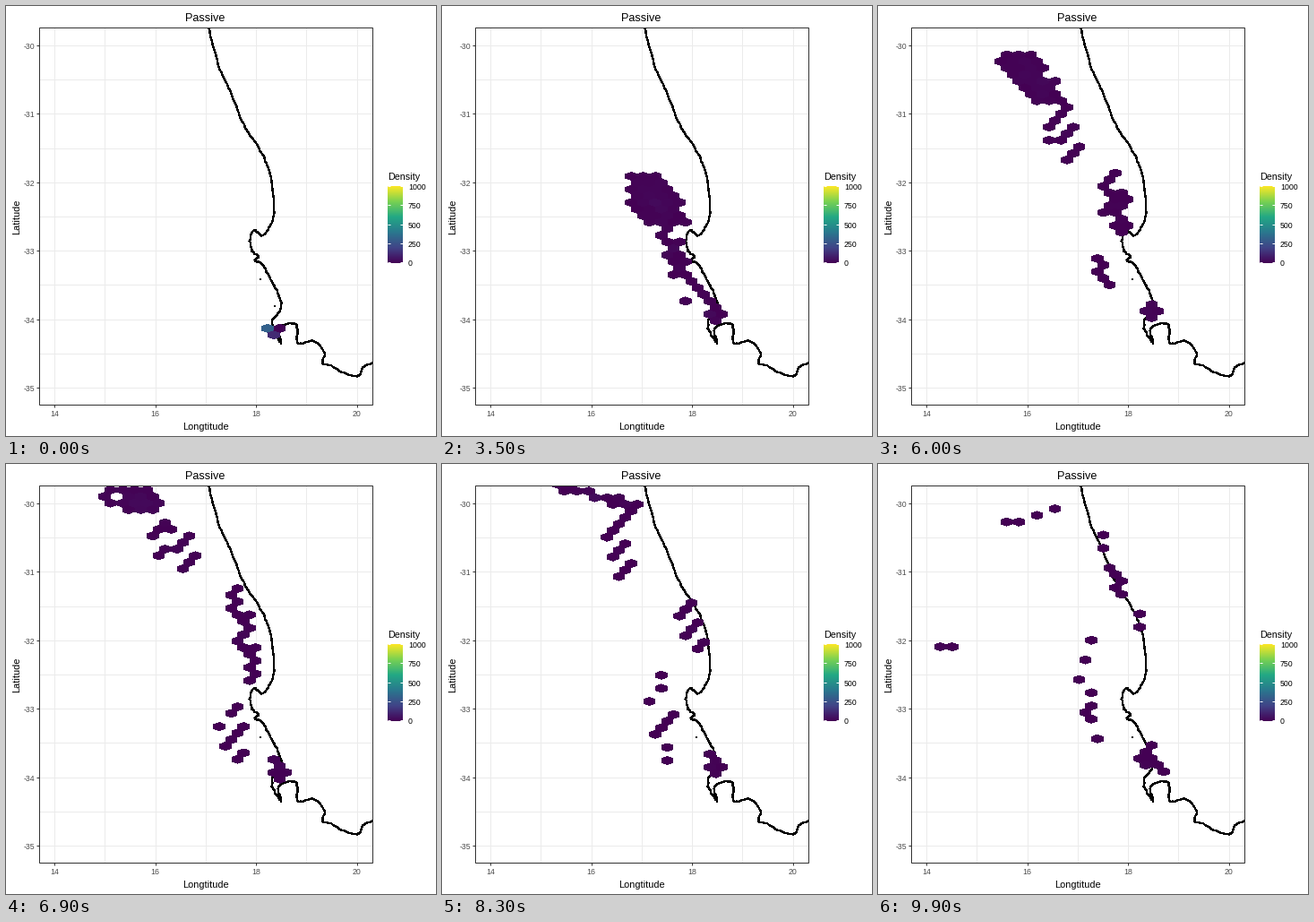
A matplotlib script for the animation above (10 s loop, 480 px wide and 480 px high).

```python
import numpy as np
import matplotlib.pyplot as plt
from matplotlib.animation import FuncAnimation
from matplotlib.collections import PolyCollection
from matplotlib.colors import LinearSegmentedColormap
from matplotlib.patches import Rectangle

plt.rcParams["font.family"] = "Liberation Sans"

SIZE, FRAMES = 480, 100
X0, DX, DY = 285.4, 6.75, 7.335  # hexagon grid: origin, half width, row step
L, R, T, B = 37, 409, 24, 445
WEIGHT = 3  # density carried by one particle
CMAP = LinearSegmentedColormap.from_list(
    "density", plt.get_cmap("viridis")(np.linspace(0, 1, 6)))

fig = plt.figure(figsize=(SIZE / 72, SIZE / 72), dpi=72, facecolor="white")
ax = fig.add_axes([0, 0, 1, 1])
ax.axis("off")


def lon(deg):
    return 54 + 56.25 * (deg - 14)


def lat(deg):
    return 44 - 76.4 * (deg + 30)


def line(x, y, color, width=1, **kw):
    return ax.plot(x, y, color=color, lw=width, solid_capstyle="butt", **kw)[0]


def text(x, y, s, size=8.8, color="black", ha="center", va="baseline", **kw):
    ax.text(x, y, s, fontsize=size, color=color, ha=ha, va=va, **kw)


# Panel, grid and axes
for d in range(14, 21):
    line([lon(d)] * 2, [T, B], "#EBEBEB", zorder=1)
for d in np.arange(-35, -29.5, 0.5):
    line([L, R], [lat(d)] * 2, "#EBEBEB", zorder=1)
for d in range(14, 21, 2):
    line([lon(d)] * 2, [B, B + 3], "#333333")
    text(lon(d), 458.5, str(d), color="#4D4D4D")
for d in range(-35, -29):
    line([L - 3, L], [lat(d)] * 2, "#333333")
    text(32, lat(d) + 4, str(d), color="#4D4D4D", ha="right")
panel = Rectangle((L, T), R - L, B - T, fill=False, ec="#333333", lw=1, zorder=6)
ax.add_patch(panel)
text(222.5, 17, "Passive", 12.6)
text(223, 473, "Longtitude", 11)
text(12, 235, "Latitude", 11, va="center", rotation=90)

# Legend
text(426, 194, "Density", 10.7, ha="left")
ax.imshow(np.linspace(1, 0, 256)[:, None], cmap=CMAP, aspect="auto",
          extent=(426, 443, 287, 201), interpolation="nearest")
for v in range(0, 1001, 250):
    y = 286 - 0.085 * v
    for x in (426, 439.6):
        line([x, x + 3.4], [y, y], "white")
    text(449, y + 4, str(v), ha="left")
ax.set(xlim=(0, SIZE), ylim=(SIZE, 0))

# Coastline: a spline through a few capes and bays, slightly rough
coast = np.array([
    (226, 24), (239, 70), (254, 104), (265, 132), (282, 158), (295, 187),
    (299, 222), (297, 241), (286, 256), (278, 250), (273, 257), (274, 272),
    (282, 279), (278, 284), (286, 288), (296, 307), (303, 320), (307, 337),
    (297, 352), (299, 364), (307, 376), (304, 361), (313, 355), (325, 357),
    (326, 377), (343, 374), (356, 387), (353, 398), (363, 402), (376, 409),
    (393, 413), (399, 403), (410, 398)], float)


def spline(p, steps=8):
    """Catmull-Rom curve through the points p."""
    p = np.vstack([p[0], p, p[-1]])
    a, b, c, d = (q[:, None] for q in (p[:-3], p[1:-2], p[2:-1], p[3:]))
    t = np.linspace(0, 1, steps, endpoint=False)[:, None]
    curve = b + t * (c - a + t * (2 * a - 5 * b + 4 * c - d
                                  + t * (3 * (b - c) + d - a))) / 2
    return np.vstack([curve.reshape(-1, 2), p[-1]])


shape = spline(coast)
shape += np.random.default_rng(4).normal(0, 0.35, shape.shape)
line(*shape.T, "black", 1.3, antialiased=False, zorder=3).set_clip_path(panel)
for x, y, s in [(283, 304, 2), (299, 334, 2), (360, 401, 1)]:
    ax.add_patch(Rectangle((x, y), s, s, color="black", lw=0, zorder=3))

# Particle groups, each strewn along a moving stroke.
# Keys: time, stroke start x y, stroke end x y, half width, particles
plume = [(0, 292, 359.8, 292, 359.8, 0, 105), (4, 292, 359.8, 292, 359.8, 0, 90),
         (23, 272, 273, 300, 322, 11, 85), (35, 226, 190, 252, 245, 25, 100),
         (51, 178, 80, 226, 162, 14, 95), (69, 130, 29, 162, 54, 31, 70),
         (83, 133, 23, 218, 50, 9, 34), (99, 198, 50, 124, 72, 0, 4)]
trail = [(4, 299, 367, 299, 367, 0, 40), (23, 296, 315, 304, 340, 11, 30),
         (35, 252, 246, 265, 300, 10, 28), (51, 243, 168, 218, 226, 18, 20),
         (69, 184, 64, 204, 120, 24, 24), (83, 205, 58, 200, 135, 18, 14),
         (99, 72, 204, 82, 200, 5, 4)]
shore = [(4, 299, 367, 299, 367, 0, 1), (35, 270, 300, 304, 335, 5, 9),
         (51, 272, 228, 264, 278, 13, 16), (69, 258, 139, 278, 242, 12, 24),
         (83, 279, 155, 290, 213, 12, 15), (99, 252, 79, 292, 189, 9, 9)]
bay = [(23, 286, 346, 292, 350, 3, 4), (51, 245, 300, 252, 307, 2, 2),
       (69, 258, 270, 255, 337, 15, 10), (99, 235, 200, 245, 336, 8, 8)]
colony = [(4, 305.5, 359.8, 305.5, 359.8, 0, 3), (23, 303, 336, 305, 368, 10, 26),
          (35, 304, 340, 305, 351, 3, 14), (99, 306, 316, 310, 351, 9, 8)]
groups = [np.array(g, float).T for g in (plume, trail, shore, bay, colony)]


def spread(i, ratio, start):
    """Evenly strewn values from -1 to 1, denser in the middle."""
    a = 2 * ((start + i * ratio) % 1) - 1
    return a * np.sqrt(abs(a))


def particles(k):
    pts = []
    for when, *keys in groups:
        if k < when[0] and when[0] > 4:
            continue
        x1, y1, x2, y2, width, n = (np.interp(k, when, v) for v in keys)
        i = np.arange(round(n))
        along = (1 + spread(i, 0.618034, 0)) / 2
        pts.append(np.c_[x1 + (x2 - x1) * along + width * spread(i, 0.754878, 0.5),
                         y1 + (y2 - y1) * along])
    return np.vstack(pts)


def cells(k):
    """Occupied hexagons and their densities; the grid hangs from the top particle."""
    x, y = particles(k).T
    top = y.argmin()
    odd = np.round((x[top] - X0) / DX) % 2
    row = np.round((y - y[top]) / DY)
    off = (row + odd) % 2
    col = 2 * np.round(((x - X0) / DX - off) / 2) + off
    spots, count = np.unique(np.c_[col, row], axis=0, return_counts=True)
    return spots * (DX, DY) + (X0, y[top]), WEIGHT * count


HEX = np.array([(0, -2), (1, -1), (1, 1), (0, 2), (-1, 1), (-1, -1)])
HEX = HEX * (DX - 0.4, DY / 3 - 0.25)
hexes = PolyCollection([], linewidths=0, antialiased=False, zorder=4)
ax.add_collection(hexes)
hexes.set_clip_path(panel)


def draw(k):
    mid, density = cells(k)
    hexes.set_verts(mid[:, None] + HEX)
    hexes.set_facecolor(CMAP(density / 1000))
    return hexes,


anim = FuncAnimation(fig, draw, frames=FRAMES, interval=100, repeat=True,
                     repeat_delay=0)
plt.show()
```
